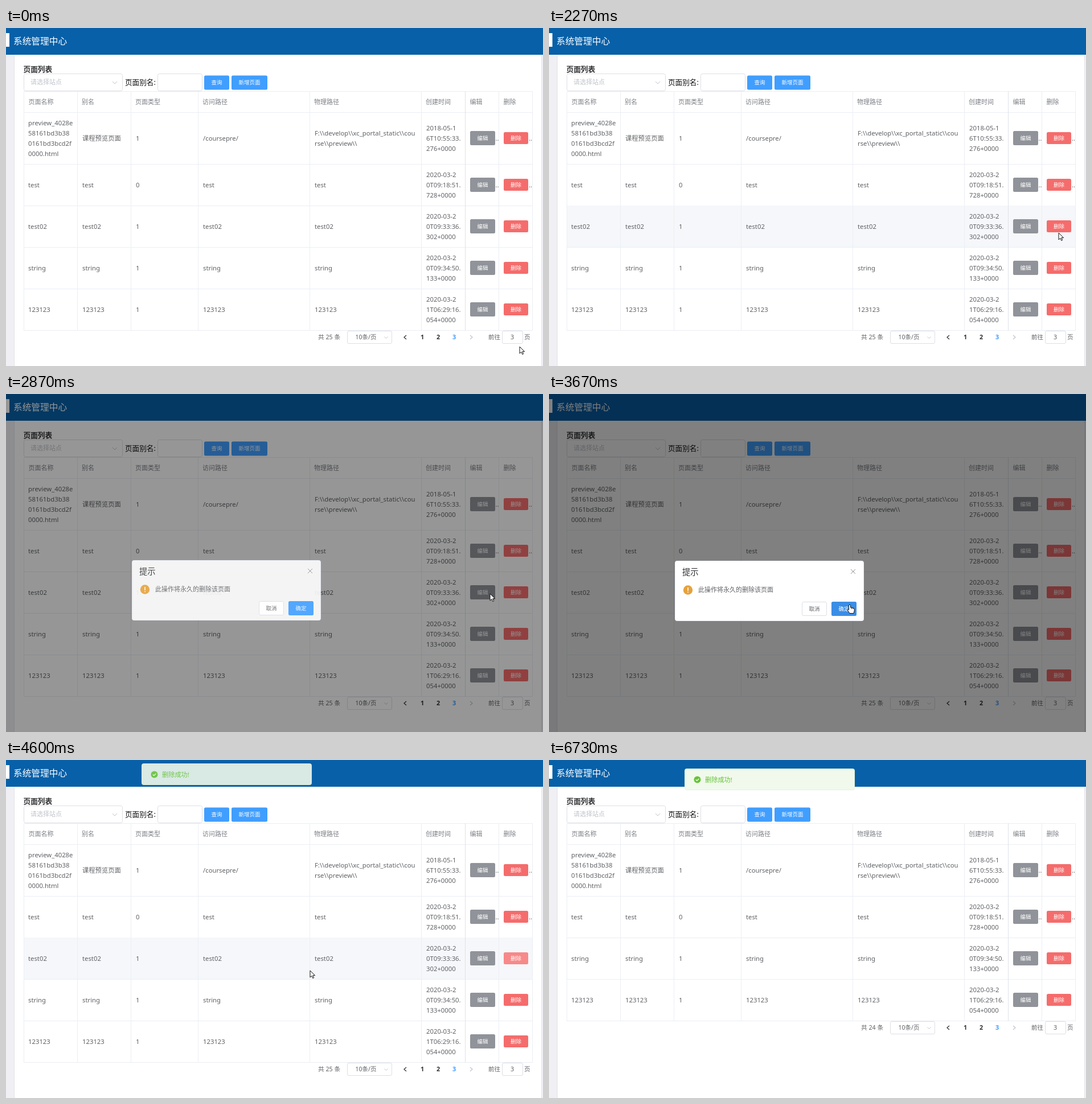
Recreate the animation shown at these times as an HTML page with a canvas. Size 943 px wide and 594 px high, loop 6790 ms.

```html
<!DOCTYPE html>
<html lang="zh-CN">
<head>
<meta charset="utf-8">
<title>系统管理中心</title>
<style>
html, body { margin: 0; width: 100%; height: 100%; overflow: hidden; background: #fff; }
canvas { display: block; }
</style>
</head>
<body>
<canvas id="stage" width="943" height="594"></canvas>
<script>
const ctx = document.getElementById('stage').getContext('2d');
const LOOP = 6790, TICK = 200 / 3;
const FONT = '"Noto Sans", "Noto Sans CJK SC", "Noto Sans CJK", sans-serif';
const BLUE = '#409eff', LIGHT_BLUE = '#66b1ff', LINE = '#ebeef5', BORDER = '#dcdfe6';
const INK = '#606266', MUTED = '#c0c4cc', GREY = '#909399', RED = '#f56c6c', LIGHT_RED = '#f78989';
const REMOVED = 4730;

const columns = [31, 125, 219, 337, 533, 729, 806, 865, 924];
const headings = ['页面名称', '别名', '页面类型', '访问路径', '物理路径', '创建时间', '编辑', '删除'];
const simple = (name, type, ...date) => [[name], [name], [type], [name], [name], date];
const records = [
  [['preview_4028e', '58161bd3b38', '0161bd3bcd2f', '0000.html'], ['课程预览页面'], ['1'], ['/coursepre/'],
    ['F:\\\\develop\\\\xc_portal_static\\\\cou', 'rse\\\\preview\\\\'], ['2018-05-1', '6T10:55:33.', '276+0000']],
  simple('test', '0', '2020-03-2', '0T09:18:51.', '728+0000'),
  simple('test02', '1', '2020-03-2', '0T09:33:36.', '302+0000'),
  simple('string', '1', '2020-03-2', '0T09:34:50.', '133+0000'),
  simple('123123', '1', '2020-03-2', '1T06:29:16.', '054+0000')
];

// Pointer stops: time, x, y
const stops = [
  [133, 902, 560], [867, 898, 198], [1803, 898, 198], [2270, 895, 360], [2533, 893, 349],
  [2740, 893, 349], [3333, 528, 370], [4400, 528, 370], [4600, 534, 370], [4867, 546, 378],
  [5200, 546, 378], [5400, 600, 475]
];
const arrow = new Path2D('M0 0V12L2.9 9.4L4.8 13.6L6.7 12.7L4.8 8.7H8.6Z');
const hand = new Path2D('M-1.5 1.2Q0 -1 1.5 1.2V5.2L3.5 5.4L6 6L8.2 7.3V11L7 15.5H0L-3.8 9.8Q-4 7.6 -1.5 9.3Z');

const clamp = v => Math.max(0, Math.min(1, v));
const progress = (t, start, length) => clamp((t - start) / length);

// CSS "ease" curve
function ease(p) {
  const bez = (u, a, b) => 3 * u * (1 - u) ** 2 * a + 3 * u * u * (1 - u) * b + u ** 3;
  let lo = 0, hi = 1;
  for (let i = 0; i < 20; i++) {
    const mid = (lo + hi) / 2;
    if (bez(mid, .25, .25) < p) lo = mid; else hi = mid;
  }
  return bez(lo, .1, 1);
}

function mix(a, b, p) {
  const part = (c, i) => parseInt(c.slice(i, i + 2), 16);
  return `rgb(${[1, 3, 5].map(i => Math.round(part(a, i) + (part(b, i) - part(a, i)) * p))})`;
}

// y is the middle of the line; baselines sit on whole pixels
function text(s, x, y, size = 11.3, color = INK, align = 'left', weight = 400) {
  ctx.font = `${weight} ${size}px ${FONT}`;
  ctx.fillStyle = color;
  ctx.textAlign = align;
  ctx.fillText(s, x, Math.round(y + size * .36));
}

function rect(x, y, w, h, color) {
  ctx.fillStyle = color;
  ctx.fillRect(x, y, w, h);
}

function box(x, y, w, h, fill, stroke, r = 3) {
  const inset = stroke ? .5 : 0;
  ctx.beginPath();
  ctx.roundRect(x + inset, y + inset, w - 2 * inset, h - 2 * inset, r);
  ctx.fillStyle = fill;
  ctx.fill();
  if (stroke) {
    ctx.strokeStyle = stroke;
    ctx.lineWidth = 1;
    ctx.stroke();
  }
}

function button(label, x, y, w, h, fill, color = '#fff', stroke) {
  box(x, y, w, h, fill, stroke, 2.5);
  text(label, x + w / 2, y + h / 2, 9.5, color, 'center');
}

function line(color, width, ...points) {
  ctx.beginPath();
  points.forEach(([x, y]) => ctx.lineTo(x, y));
  ctx.strokeStyle = color;
  ctx.lineWidth = width;
  ctx.stroke();
}

const chevronDown = (x, y, s) => line(MUTED, 1, [x - s, y - s / 2], [x, y + s / 2], [x + s, y - s / 2]);
const chevronSide = (x, y, d, color) => line(color, 1.2, [x - 2 * d, y - 3.5], [x + 2 * d, y], [x - 2 * d, y + 3.5]);

function pointerAt(t) {
  const next = stops.findIndex(s => s[0] > t);
  if (next === 0) return stops[0].slice(1);
  if (next < 0) return stops[stops.length - 1].slice(1);
  const a = stops[next - 1], b = stops[next];
  const p = progress(t, a[0], b[0] - a[0]), s = p * p * (3 - 2 * p);
  return [a[1] + (b[1] - a[1]) * s, a[2] + (b[2] - a[2]) * s];
}

function drawFrame() {
  rect(0, 0, 943, 594, '#fff');
  rect(0, 47, 14, 547, '#f0f0f4');
  rect(14, 47, 1, 547, '#e2e3e8');
  rect(940, 47, 3, 547, '#f0f0f4');
  rect(940, 47, 1, 547, '#e4e5ea');
  rect(0, 0, 943, 47, '#0760a8');
  rect(-18, 9, 24, 24, '#fff');
  text('系统管理中心', 13, 23.5, 15.7, '#fff');
}

function drawFilters() {
  text('页面列表', 30.5, 72, 12.7, '#303133', 'left', 700);
  box(31, 80, 174, 31, '#fff', BORDER);
  text('请选择站点', 43, 95.5, 11, MUTED);
  chevronDown(191, 96, 4);
  text('页面别名:', 209, 95, 12.6, '#111');
  box(266, 80, 79, 31, '#fff', BORDER);
  button('查询', 348, 83.5, 44, 25, BLUE);
  button('新增页面', 396, 83.5, 63, 25, BLUE);
}

function deleteColor(t, row, hovered) {
  if (row === 2) {
    if (t > 2650 && t < 2750) return RED;
    if (t > 4150) return mix(LIGHT_RED, RED, progress(t, 6600, 120));
  }
  return hovered ? LIGHT_RED : RED;
}

function drawTable(t, rows, px, py) {
  const blocked = (t > 2750 && t < 4350) || t >= 5395;
  headings.forEach((h, i) => text(h, columns[i] + (i < 1 || i > 5 ? 8.5 : 8), 130, 11, '#7c7f85'));
  let top = 149;
  rows.forEach((cells, r) => {
    const height = r ? 73 : 90, mid = top + height / 2 - (r ? 0 : .5);
    const inRow = !blocked && py >= top && py < top + height;
    if (inRow) rect(31, top, 893, height, '#f5f7fa');
    cells.forEach((lines, c) => lines.forEach((s, i) =>
      text(s, columns[c] + (c ? 9 : 8), mid + (i - (lines.length - 1) / 2) * 18)));
    button('编辑', 815, mid - 12.5, 44, 25, GREY);
    const onDelete = inRow && px > 874 && px < 917 && Math.abs(py - mid) < 11;
    button('删除', 874, mid - 10.5, 43, 21, deleteColor(t, r, onDelete));
    if (r < 2) [859.5, 918].forEach(x => text('..', x, mid));
    rect(31, top + height, 893, 1, LINE);
    top += height;
  });
  rect(31, 111, 893, 1, LINE);
  rect(31, 148, 893, 1, LINE);
  columns.forEach(x => rect(x, 111, 1, top - 110, LINE));
  rect(806, 111, 1, top - 110, '#dfe2ea');
  return top;
}

function drawPager(y, total) {
  text(`共 ${total} 条`, 548, y, 10.7);
  box(599, y - 11.5, 79, 23, '#fff', BORDER, 2.5);
  text('10条/页', 632, y, 10.5, INK, 'center');
  chevronDown(667.5, y + .5, 3);
  chevronSide(701, y, -1, '#303133');
  ['1', '2', '3'].forEach((n, i) => text(n, 731 + 28 * i, y, 10.8, i === 2 ? BLUE : '#303133', 'center', 700));
  chevronSide(817, y, 1, MUTED);
  text('前往', 847, y, 10.5);
  box(871, y - 11.5, 37, 23, '#fff', BORDER, 2.5);
  text('3', 889, y, 10.8, INK, 'center');
  text('页', 910, y, 10.5);
}

function drawDialog(t) {
  if (t < 2660 || t > 4410) return;
  const closing = t > 4105;
  const shown = closing ? 1 - ease(progress(t, 4105, 300)) : ease(progress(t, 2664, 300));
  const shade = closing ? 1 - ease(progress(t, 4105, 165)) : ease(progress(t, 2664, 385));
  rect(0, 0, 943, 594, `rgba(0,0,0,${shade / 2})`);
  ctx.save();
  ctx.globalAlpha = closing ? shown * .9 : shown ** 1.5;
  ctx.translate(0, Math.round(-20 * (1 - shown)));
  box(221, 293, 332, 106, '#fff', LINE);
  text('提示', 234, 313, 14.3, '#303133');
  line(GREY, 1, [530, 308], [538, 316]);
  line(GREY, 1, [538, 308], [530, 316]);
  ctx.beginPath();
  ctx.arc(244, 344.5, 8.2, 0, 7);
  ctx.fillStyle = '#e6a23c';
  ctx.fill();
  rect(243.2, 340, 1.6, 6, '#fff');
  rect(243.2, 347.5, 1.6, 1.6, '#fff');
  text('此操作将永久的删除该页面', 262, 344.5, 11);
  button('取消', 444, 365, 44, 25, '#fff', INK, BORDER);
  const confirm = closing ? LIGHT_BLUE : t < 3250 ? BLUE : mix(LIGHT_BLUE, '#3a8ee6', progress(t, 3480, 180));
  button('确定', 496, 365, 44, 25, confirm);
  ctx.restore();
}

function drawMessage(t) {
  if (t < 4412) return;
  ctx.save();
  ctx.globalAlpha = ease(progress(t, 4412, 300));
  ctx.translate(0, Math.round(-38 * (1 - ease(progress(t, 4412, 400)))));
  box(238, 15, 299, 38, '#f0f9eb', '#e1f3d8');
  ctx.beginPath();
  ctx.arc(260.5, 34.5, 6, 0, 7);
  ctx.fillStyle = '#67c23a';
  ctx.fill();
  line('#fff', 1.2, [257.8, 34.5], [259.8, 36.5], [263.4, 32.8]);
  text('删除成功!', 274, 34.5, 11.2, '#67c23a');
  ctx.restore();
}

function drawPointer(t, x, y) {
  if (t >= 5395) return;
  const shape = (t > 990 && t < 1860) || (t > 3300 && t < 4440) ? hand : arrow;
  ctx.save();
  ctx.translate(Math.round(x), Math.round(y));
  ctx.fillStyle = '#fff';
  ctx.strokeStyle = '#111';
  ctx.lineWidth = 1;
  ctx.fill(shape);
  ctx.stroke(shape);
  if (shape === hand) [3.5, 6].forEach(k => line('#111', .8, [k, 5.8], [k, 8]));
  ctx.restore();
}

function render(now) {
  // The picture advances in steps of a fifteenth of a second
  const t = Math.floor((now % LOOP + 5) / TICK) * TICK;
  const [x, y] = pointerAt(t);
  const rows = t < REMOVED ? records : records.filter((_, i) => i !== 2);
  drawFrame();
  drawFilters();
  const bottom = drawTable(t, rows, x, y);
  drawPager(bottom + 12.5, 20 + rows.length);
  drawDialog(t);
  drawMessage(t);
  drawPointer(t, x, y);
}

const start = performance.now();
function loop() {
  render(performance.now() - start);
  requestAnimationFrame(loop);
}
loop();
</script>
</body>
</html>
```
